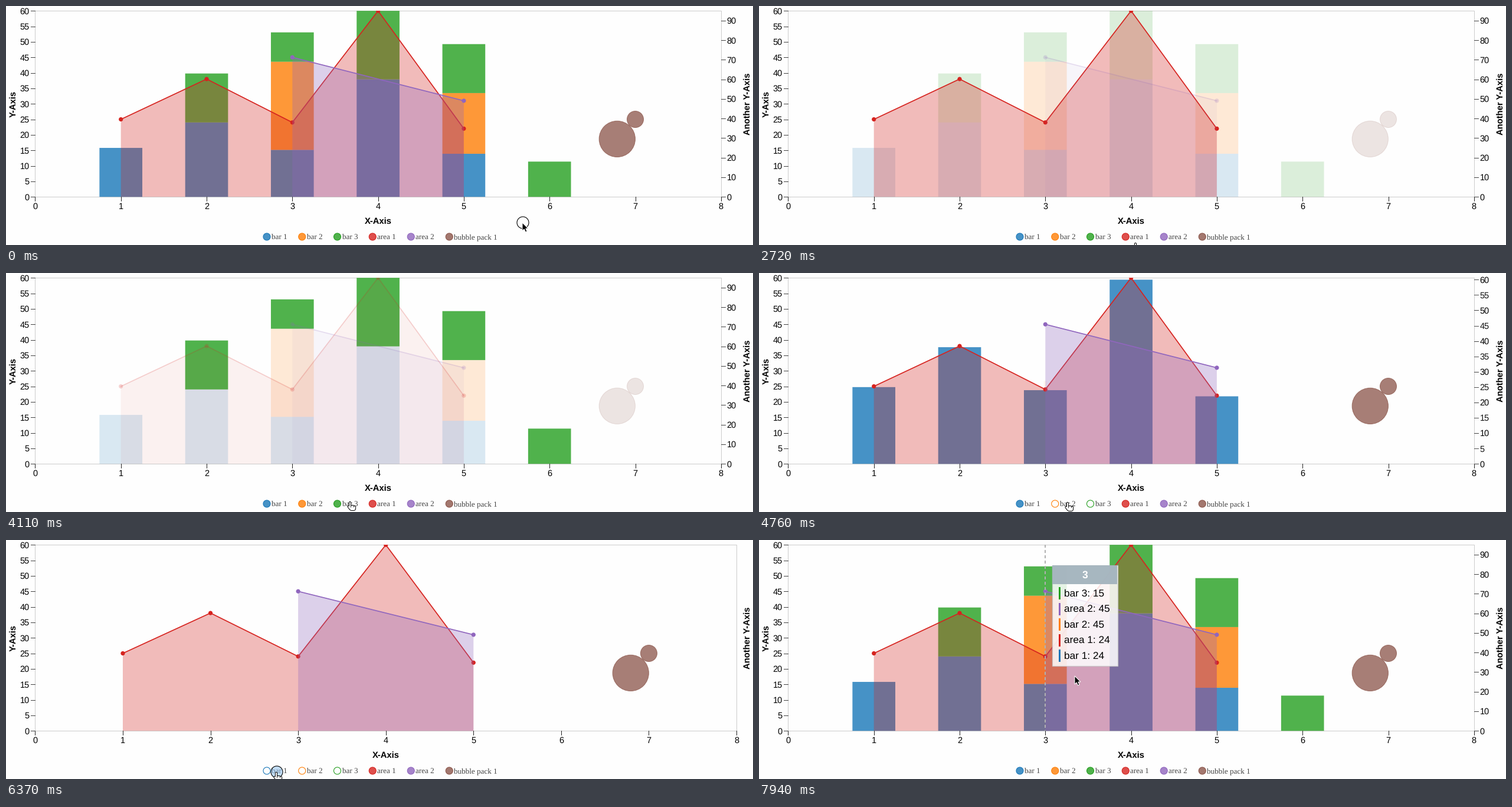
Write a matplotlib script that moves like this. It is 1266 px wide and 406 px high and loops after 8000 ms.

```python
import math
from collections import namedtuple
from itertools import accumulate

import matplotlib.pyplot as plt
import numpy as np
from matplotlib.animation import FuncAnimation
from matplotlib.lines import Line2D
from matplotlib.patches import Circle, Polygon, Rectangle
from matplotlib.transforms import Bbox

W, H, DPI = 1266, 406, 64
PT = 72 / DPI                      # points per pixel
LOOP, STEP = 8000, 40
TOP, BASE = 8.2, 324.2
PLOT_H = BASE - TOP
TRAVEL, DELAY, MOVE, FADE = 340, 80, 300, 150     # ms

SANS, SERIF = "Liberation Sans", "Liberation Serif"
COLORS = {
    "bar 1": "#1877b9", "bar 2": "#ff7f06", "bar 3": "#259f20",
    "area 1": "#d6231f", "area 2": "#9066be", "bubble pack 1": "#8c564b",
}
LEGEND_X = dict(zip(COLORS, accumulate((33.5 + 5.25 * len(n) for n in COLORS), initial=442)))


def by_x(*values):
    return {x: v for x, v in enumerate(values, 1) if v}


BARS = {
    "bar 1": by_x(25, 38, 24, 60, 22),
    "bar 2": by_x(0, 0, 45, 0, 31),
    "bar 3": by_x(0, 25, 15, 35, 25, 18),
}
AREAS = {"area 1": BARS["bar 1"], "area 2": BARS["bar 2"]}
BUBBLES = ((-30.7, 33.4, 30.6), (0, 0, 14))   # offset from the data point, radius

Layout = namedtuple("Layout", "bars shapes x0 x1 xmax left right")


def stack(bars, x):
    return sum(BARS[b].get(x, 0) for b in bars)


def layout(count, shapes=True):
    """Chart with the first few bar series, with or without the other series."""
    bars = tuple(BARS)[:count]
    right = max(stack(bars, x) for x in range(1, 7)) if bars else None
    return Layout(bars, shapes, 49.4 if shapes else 23.2, 1211.8 if bars else 1238,
                  8 if shapes else 6, 60 if shapes else None, right)


# Cursor stops: arrival time, position, legend item pointed at.
STOPS = (
    (0, 875, 368, None), (1400, 766, 388, "bubble pack 1"), (2200, 703, 388, "area 2"),
    (2720, 638, 402, "area 1"), (3520, 523, 389, "bar 2"), (4080, 583, 388, "bar 3"),
    (4440, 523, 389, "bar 2"), (5400, 458, 394, "bar 1"), (7920, 535, 231, None),
)
CLICKS = (
    (-90, layout(3)), (4120, layout(2)), (4480, layout(1)), (5523, layout(0)),
    (6310, layout(1, shapes=False)), (7040, layout(3)),
)
CHANGES = [(t + DELAY, state) for t, state in CLICKS]
HOVERS = sorted([(t - TRAVEL / 2, item) for t, _, _, item in STOPS]
                + [(t, None) for t, _ in CLICKS], key=lambda e: e[0])
ARROW = ((0, 0), (0, 14), (3.2, 11), (5.5, 16), (8, 15), (5.8, 10), (10, 10))

plt.rcParams["text.hinting"] = "none"
fig = plt.figure(figsize=(W / DPI, H / DPI), dpi=DPI, facecolor="#fefefe")
ax = fig.add_axes((0, 0, 1, 1))
ax.set_xlim(0, W)
ax.set_ylim(H, 0)
ax.axis("off")
CLIP = Bbox([[0, 0], [W, H - 8]])
drawn = []


def lerp(a, b, p):
    return a + (b - a) * p


def clamp(v):
    return min(max(v, 0), 1)


def smooth(p):
    p = clamp(p)
    return p * p * (3 - 2 * p)


def cubic(p):
    p = clamp(p)
    return 4 * p ** 3 if p < .5 else 1 - 4 * (1 - p) ** 3


def current(events, t):
    """Previous value, present value and the start time of the present one."""
    i = max(k for k, e in enumerate(events) if e[0] <= t)
    return events[max(i - 1, 0)][1], events[i][1], events[i][0]


def add(artist, clip=False):
    artist.set_zorder(len(drawn) + 1)
    ax.add_artist(artist)
    if clip:
        artist.set_clip_box(CLIP)
    drawn.append(artist)


def line(xs, ys, color, width=1, alpha=1.0, clip=False, **kw):
    add(Line2D(xs, ys, color=color, lw=width * PT, alpha=alpha, **kw), clip)


def label(x, y, s, size=14.5, font=SANS, keep=False, **kw):
    txt = ax.text(x, y, s, fontsize=size * PT, family=font, va="baseline", **kw)
    if not keep:
        txt.set_zorder(len(drawn) + 1)
        drawn.append(txt)


def ticks(top):
    """Tick values and labels for a domain from zero to top, about ten of them."""
    if top is None:
        return {}
    raw = top / 10
    base = 10 ** math.floor(math.log10(raw))
    err = base / raw
    step = base * (10 if err <= .15 else 5 if err <= .35 else 2 if err <= .75 else 1)
    digits = 1 if step < .99 else 0
    return {round(i * step, 2): f"{i * step:.{digits}f}"
            for i in range(int(top / step + 1e-6) + 1)}


def blended_ticks(a, b, p):
    old, new = ticks(a), ticks(b)
    for v in sorted({**old, **new}):
        alpha = 1 if v in old and v in new else p if v in new else 1 - p
        if alpha > .01:
            yield v, new.get(v, old.get(v)), alpha


def height(top, v):
    return PLOT_H * v / top if top else 0


def x_at(s, v):
    return s.x0 + v * (s.x1 - s.x0) / s.xmax


def bar_box(s, name, x):
    """Centre, width, bottom, height and opacity of one bar."""
    below = stack([b for b in s.bars if b < name], x)
    shown = name in s.bars
    return np.array((
        x_at(s, x),
        .5 * (s.x1 - s.x0) / s.xmax if shown else 0,
        height(s.right, below),
        height(s.right, BARS[name][x]) if shown else 0,
        float(shown),
    ))


def draw_axes(a, b, p):
    x0, x1 = lerp(a.x0, b.x0, p), lerp(a.x1, b.x1, p)
    add(Rectangle((x0, TOP), x1 - x0, PLOT_H, fill=False, ec="#cccccc", lw=PT))
    for v, s, alpha in blended_ticks(a.xmax, b.xmax, p):
        x = lerp(x_at(a, v), x_at(b, v), p)
        line((x, x), (BASE, 330.5), "#222222", alpha=alpha)
        label(x, 345, s, ha="center", alpha=alpha)
    sides = ((a.left, b.left, x0, -1, "right"), (a.right, b.right, x1, 1, "left"))
    for top_a, top_b, x, side, ha in sides:
        for v, s, alpha in blended_ticks(top_a, top_b, p):
            y = BASE - lerp(height(top_a, v), height(top_b, v), p)
            line((x, x + 7 * side), (y, y), "#444444", alpha=alpha)
            label(x + 9.7 * side, y + 5.3, s, ha=ha, alpha=alpha)
    label((x0 + x1) / 2, 371, "X-Axis", 14.8, weight="bold", ha="center")


def draw_series(a, b, p, dim):
    for name, values in BARS.items():
        for x in values:
            cx, w, y, h, seen = lerp(bar_box(a, name, x), bar_box(b, name, x), p)
            if seen > .01:
                add(Rectangle((cx - w / 2, BASE - y - h), w, h, lw=0, snap=False,
                              fc=COLORS[name], alpha=.8 * seen * dim[name]), True)

    seen = lerp(float(a.shapes), float(b.shapes), p)
    if seen < .01:
        return

    def point(x, v):
        return (lerp(x_at(a, x), x_at(b, x), p),
                BASE - lerp(height(a.left, v), height(b.left, v), p))

    for name, values in AREAS.items():
        pts = [point(x, v) for x, v in values.items()]
        xs, ys = zip(*pts)
        alpha = seen * dim[name]
        add(Polygon([(xs[0], BASE), *pts, (xs[-1], BASE)], lw=0,
                    fc=COLORS[name], alpha=.3 * alpha), True)
        line(xs, ys, COLORS[name], 1.7, alpha, True)
        for q in pts:
            add(Circle(q, 3.6, lw=0, fc=COLORS[name], alpha=alpha), True)

    cx, cy = point(7, 25)
    name = "bubble pack 1"
    for dx, dy, r in BUBBLES:
        add(Circle((cx + dx * seen, cy + dy * seen), r * seen, lw=PT,
                   color=COLORS[name], alpha=.76 * seen * dim[name]))


def draw_legend(state):
    for name, color in COLORS.items():
        on = name in state.bars or (state.shapes and name not in BARS)
        center = (LEGEND_X[name], 392)
        add(Circle(center, 6, lw=0, fc=color, alpha=.8 if on else 0))
        add(Circle(center, 6, fill=False, ec=color, lw=1.1 * PT))


def draw_tooltip(alpha, x=3):
    if alpha <= 0:
        return
    px = x_at(CLICKS[0][1], x)
    line((px, px), (TOP, BASE), "#b0b0b0", 2, alpha, dashes=(2.5, 2))
    add(Rectangle((496.5, 42.5), 111, 171, fc="white", ec="#c4c4c4",
                  lw=1.3 * PT, alpha=.86 * alpha))
    add(Rectangle((497, 43), 110, 32, lw=0, fc="#a3b3bd", alpha=.95 * alpha))
    label(552, 65, str(x), 17.5, weight="bold", color="white", ha="center", alpha=alpha)
    values = {**BARS, **AREAS}
    for i, name in enumerate(sorted(values, key=lambda n: (-int(n[-1]), n != "bar 3", n))):
        y = 90.5 + 26.5 * i
        add(Rectangle((508, y - 10.5), 3, 21, lw=0, fc=COLORS[name], alpha=alpha))
        label(517, y + 5.8, f"{name}: {values[name][x]}", 17.3, alpha=alpha)


def cursor_at(t):
    pos = np.array(STOPS[0][1:3], float)
    for arrive, x, y, _ in STOPS[1:]:
        pos = lerp(pos, np.array((x, y)), smooth((t - arrive) / TRAVEL + 1))
    return pos


def draw_hand(x, y):
    """Finger, knuckles, thumb and palm as round strokes, outline first."""
    fingers = [((x + 2.6 * i,) * 2, (y + 2 + 5 * (i > 0) + .5 * i, y + 12))
               for i in range(4)]
    thumb = ((x - 2.4, x + 1), (y + 9, y + 13))
    palm = ((x + 1.5, x + 6.3), (y + 12, y + 12))
    for color, grow in (("black", 2), ("white", 0)):
        for xs, ys in (*fingers, thumb):
            line(xs, ys, color, 2.2 + grow, solid_capstyle="round")
        line(*palm, color, 5 + grow, solid_capstyle="round")


def draw_cursor(t):
    pos = cursor_at(t)
    for start, _ in CLICKS:
        if 0 <= t - start < 150:
            center = pos + (1, 0)
            if t - start < 90:
                add(Circle(center, 10, lw=0, fc="#8fc0ee", alpha=.55))
            add(Circle(center, 10, fill=False, ec="black", lw=1.1 * PT))
    if pos[1] > 382:
        draw_hand(*pos)
    else:
        add(Polygon(pos + np.array(ARROW), fc="black", ec="white", lw=PT))


def dimming(t):
    old, new, start = current(HOVERS, t)
    p = clamp((t - start) / FADE)

    def level(hover, name):
        return 1 if hover in (None, name) else .2

    return {n: lerp(level(old, n), level(new, n), p) for n in COLORS}


def update(i):
    t = i * STEP + STEP / 2
    for artist in drawn:
        artist.remove()
    drawn.clear()
    a, b, start = current(CHANGES, t)
    p = cubic((t - start) / MOVE)
    draw_axes(a, b, p)
    draw_series(a, b, p, dimming(t))
    draw_legend(b)
    draw_tooltip(clamp((t - STOPS[-1][0] + 190) / FADE))
    draw_cursor(t)
    return drawn


for name in COLORS:
    label(LEGEND_X[name] + 8, 396, name, 13.1, SERIF, keep=True, color="#444444")
for x, s in ((17.5, "Y-Axis"), (1261.5, "Another Y-Axis")):
    label(x, 166, s, 14.8, keep=True, weight="bold", rotation=90,
          rotation_mode="anchor", ha="center")

anim = FuncAnimation(fig, update, frames=LOOP // STEP, interval=STEP,
                     init_func=lambda: [], repeat=True, repeat_delay=0,
                     cache_frame_data=False)
plt.show()
```
